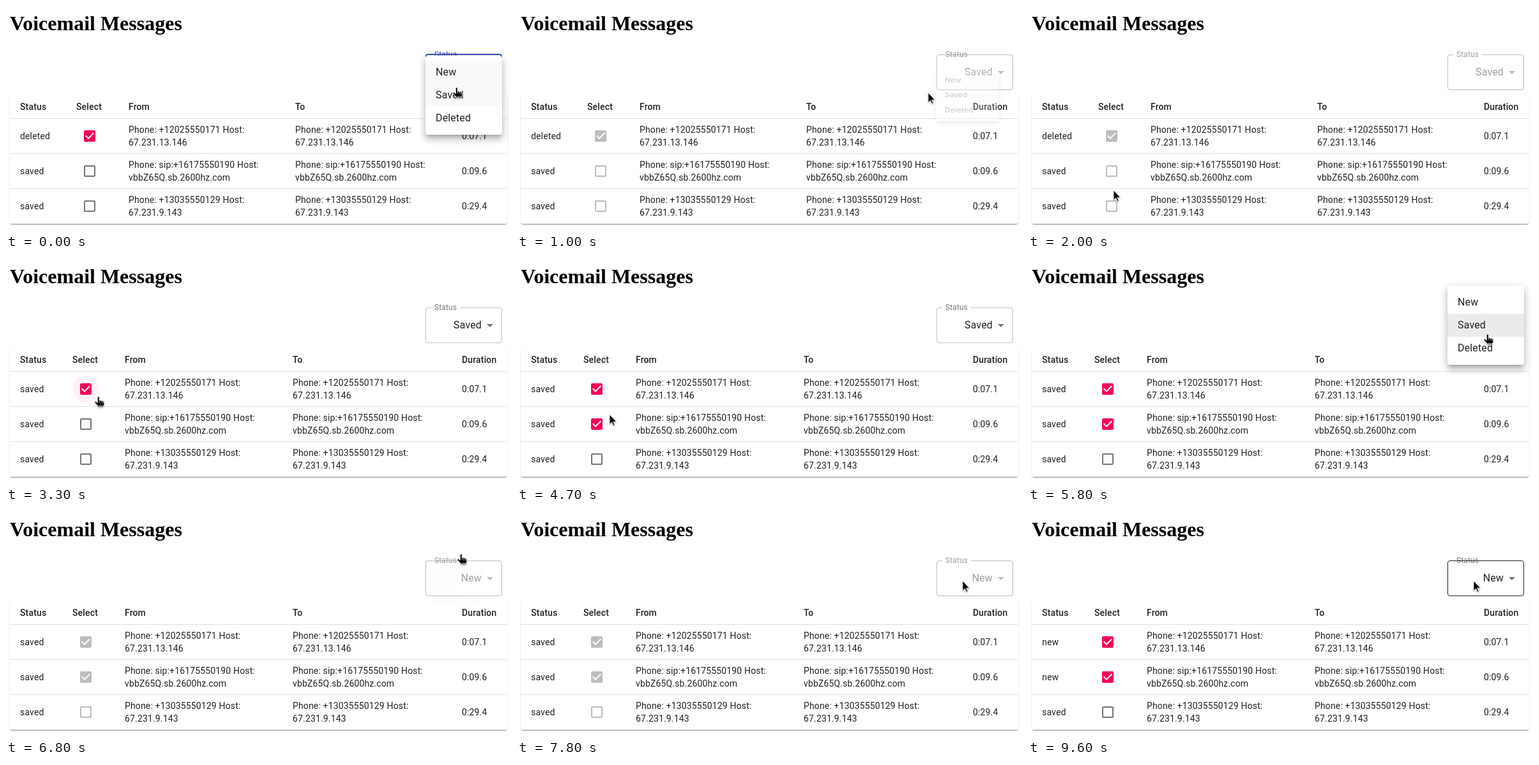
Recreate the animation shown at these times as an HTML page. Size 791 by 353 pixels, loop 9.8 s.

```html
<!DOCTYPE html>
<html lang="en">
<head>
<meta charset="utf-8">
<title>Voicemail Messages</title>
<style>
html, body { margin: 0; width: 100%; height: 100%; overflow: hidden; background: #fff; }
body { position: relative; color: rgba(0,0,0,.87); font: 14px/20px Roboto, sans-serif; letter-spacing: .15px; }
body * { position: absolute; box-sizing: border-box; white-space: pre; }
h1 { margin: 0; left: 6px; top: 9px; color: #000; font: bold 32px/37px "Liberation Serif", serif; letter-spacing: 0; }
#card { left: 6px; top: 140px; width: 779px; height: 202px; border-radius: 4px; background: #fff;
  box-shadow: 0 2px 1px -1px rgba(0,0,0,.2), 0 1px 1px rgba(0,0,0,.14), 0 1px 3px rgba(0,0,0,.12); }
.row { left: 0; width: 779px; height: 55px; border-bottom: 1px solid #e0e0e0; }
.row > span { top: 17px; }
.row > .two { top: 7px; }
.head { height: 37px; font-weight: 500; }
.head > span { top: 8px; }
.c0 { left: 16px; } .c1 { left: 98px; } .c2 { left: 180px; } .c3 { left: 443px; } .c4 { left: 708px; }
.wide .c1 { left: 104px; } .wide .c2 { left: 186px; } .wide .c3 { left: 447px; }
.row > .box { top: 6px; width: 42px; height: 42px; border-radius: 50%; }
.box svg { left: 9px; top: 9px; }
#field { left: 657px; bottom: calc(100% - 132px); width: 120px; height: 56px; border: 1px solid; border-radius: 4px; }
#field.focus { height: 57px; border-width: 2px; }
#label { left: 666px; top: 69px; padding: 0 5px; font-size: 12px; line-height: 14px; letter-spacing: .11px; }
#label.notched { background: #fff; z-index: 1; }
#value { right: 46px; top: 94px; font-size: 16px; }
#caret { left: 746px; top: 92px; }
#menu { left: 657px; width: 120px; height: 124px; z-index: 2; border-radius: 4px; background: #fff; transform-origin: 0 50%;
  box-shadow: 0 5px 5px -3px rgba(0,0,0,.2), 0 8px 10px 1px rgba(0,0,0,.14), 0 3px 14px 2px rgba(0,0,0,.12); }
#menu div { left: 0; width: 120px; height: 36px; padding-left: 16px; font-size: 16px; line-height: 36px; }
#cursor { left: 0; top: 0; z-index: 3; overflow: visible; filter: drop-shadow(0 1px 1px rgba(0,0,0,.3)); }
</style>
</head>
<body>
<h1>Voicemail Messages</h1>
<div id="card"></div>
<span id="label">Status</span>
<div id="field"></div>
<span id="value"></span>
<svg id="caret" width="24" height="24"><path d="M7 10l5 5 5-5z"/></svg>
<div id="menu"></div>
<svg id="cursor" width="20" height="20" stroke="#fff" stroke-width=".9">
  <g id="hand" transform="scale(1.08)">
    <path d="M-1.6 9V1.2Q-1.6-.2-.2-.2T1.2 1.2V5.2Q3 4.6 3.8 5.8Q5.4 5.2 6.2 6.4Q8 6.2 8.2 8V11.5L6.8 15H-.5L-1.5 13-5.4 8.6Q-6 7-4.4 6.8-3 7-1.6 9Z"/>
    <path d="M1.2 5.5v3M3.8 6v3M6.2 7v2.5M-.2 13.4H7" stroke-width=".7"/>
  </g>
  <path id="arrow" d="M0 0V15.5L3.6 12.2 6 17.6 8.2 16.6 5.9 11.4H10.8Z"/>
</svg>
<script>
const LOOP = 9800, STEP = 100;
// Moments of the story
const PICK_SAVED = 900, MARKED_SAVED = 3200, TICK = 4700, OPEN = 5700, PICK_NEW = 6600, MARKED_NEW = 9100;
const TICKED = 'M19 3H5c-1.11 0-2 .9-2 2v14c0 1.1.89 2 2 2h14c1.11 0 2-.9 2-2V5c0-1.1-.89-2-2-2zm-9 14l-5-5 1.41-1.41L10 14.17l7.59-7.59L19 8l-9 9z';
const EMPTY = 'M19 5v14H5V5h14m0-2H5c-1.1 0-2 .9-2 2v14c0 1.1.9 2 2 2h14c1.1 0 2-.9 2-2V5c0-1.1-.9-2-2-2z';

const $ = id => document.getElementById(id);
const black = alpha => `rgba(0,0,0,${alpha})`;
const clamp = v => Math.min(1, Math.max(0, v));
const between = (t, a, b) => t >= a && t < b;
const cell = (col, text, extra = '') => `<span class="c${col} ${extra}">${text}</span>`;

const messages = [
  ['+12025550171', '67.231.13.146', '0:07.1'],
  ['sip:+16175550190', 'vbbZ65Q.sb.2600hz.com', '0:09.6'],
  ['+13035550129', '67.231.9.143', '0:29.4']
];
$('card').innerHTML =
  `<div class="row head">${['Status', 'Select', 'From', 'To', 'Duration'].map((h, i) => cell(i, h)).join('')}</div>` +
  messages.map(([phone, host, length], i) => {
    const party = `Phone: ${phone} Host:\n${host}`;
    return `<div class="row" style="top:${37 + 55 * i}px">` + cell(0, '') +
      '<div class="c1 box"><svg width="24" height="24"><path/></svg></div>' +
      cell(2, party, 'two') + cell(3, party, 'two') + cell(4, length) + '</div>';
  }).join('');
$('menu').innerHTML = ['New', 'Saved', 'Deleted']
  .map((name, i) => `<div style="top:${8 + 36 * i}px">${name}</div>`).join('');

const rows = [...document.querySelectorAll('.row:not(.head)')].map(row => ({
  status: row.querySelector('.c0'), box: row.querySelector('.box'), icon: row.querySelector('path')
}));
const items = [...$('menu').children];

// Each move eases the pointer to a new place
const home = { x: 706, y: 128 };
const moves = [
  { from: 600, to: 700, x: 703, y: 122 },
  { from: 800, to: 1800, x: 133, y: 258 },
  { from: 1800, to: 2200, x: 135, y: 320 },
  { from: 2500, to: 2600, x: 132, y: 305 },
  { from: 2800, to: 3000, x: 145, y: 216 },
  { from: 3800, to: 4400, x: 128, y: 248 },
  { from: 4600, to: 5600, x: 720, y: 118 },
  { from: 5900, to: 6500, x: 713, y: 66 },
  { from: 6900, to: 7300, x: 300, y: 158 },
  { from: 7300, to: 7800, x: 698, y: 108 }
];

function pointer(t) {
  return moves.reduce((p, m) => {
    const f = clamp((t - m.from) / (m.to - m.from)), e = f * f * (3 - 2 * f);
    return { x: Math.round(p.x + (m.x - p.x) * e), y: Math.round(p.y + (m.y - p.y) * e) };
  }, home);
}

function menuOpacity(t) {
  const fade = start => clamp(1 - (t - start + STEP) / 320) ** 1.5;
  if (t < OPEN) return t < PICK_SAVED ? 1 : fade(PICK_SAVED);
  return t < PICK_NEW ? clamp((t - OPEN + STEP) / 200) : fade(PICK_NEW);
}

function draw(t) {
  const { x, y } = pointer(t), opacity = menuOpacity(t);
  const wide = t < MARKED_SAVED, first = t < OPEN;
  const disabled = between(t, PICK_SAVED, MARKED_SAVED) || between(t, PICK_NEW, MARKED_NEW);
  const focus = opacity > 0 && !disabled;
  const overField = between(x, 657, 777) && between(y, 76, 132);
  const hover = overField && !disabled && !focus;
  const overBox = rows.map((_, i) => !disabled && Math.hypot(x - 125, y - 204 - 55 * i) < 24);

  $('card').className = wide ? 'wide' : '';
  const updated = t < MARKED_NEW ? 'saved' : 'new';
  const statuses = [wide ? 'deleted' : updated, updated, 'saved'];
  const ticks = [true, t >= TICK, false];
  rows.forEach(({ status, box, icon }, i) => {
    status.textContent = statuses[i];
    icon.setAttribute('d', ticks[i] ? TICKED : EMPTY);
    icon.style.fill = disabled ? black(.26) : ticks[i] ? '#f50057' : black(.54);
    box.style.background = overBox[i] ? 'rgba(245,0,87,.05)' : 'none';
  });

  $('field').className = focus ? 'focus' : '';
  $('field').style.borderColor = focus ? '#3f51b5' : black(hover ? .87 : disabled ? .26 : .23);
  $('label').className = hover || opacity ? '' : 'notched';
  $('label').style.color = focus ? '#3f51b5' : black(disabled ? .38 : .54);
  $('value').textContent = between(t, PICK_SAVED, PICK_NEW) ? 'Saved' : 'New';
  $('value').style.color = black(disabled ? .38 : .87);
  $('caret').style.fill = black(disabled ? .26 : .54);

  const top = first ? 78 : 42, grow = .75 + .25 * opacity;
  const overItem = Math.floor((y - top - 8) / 36), selected = first ? 0 : 1;
  $('menu').style.top = top + 'px';
  $('menu').style.opacity = opacity;
  $('menu').style.transform = `scale(${grow},${grow * grow})`;
  items.forEach((item, i) => {
    item.style.background = i === selected && !first ? '#ebebeb' : i === selected || i === overItem ? '#f9f9f9' : '#fff';
  });

  const overMenu = opacity > 0 && x > 657;
  const hand = (overMenu || hover || overBox.includes(true)) && t < 9600;
  $('cursor').style.transform = `translate(${x}px,${y}px)`;
  $('cursor').style.display = between(t, 100, 700) ? 'none' : '';
  $('hand').style.display = hand ? '' : 'none';
  $('arrow').style.display = hand ? 'none' : '';
}

const start = performance.now();
function tick() {
  const t = (performance.now() - start) % LOOP;
  draw(Math.floor(t / STEP) * STEP);
  requestAnimationFrame(tick);
}
tick();
</script>
</body>
</html>
```
